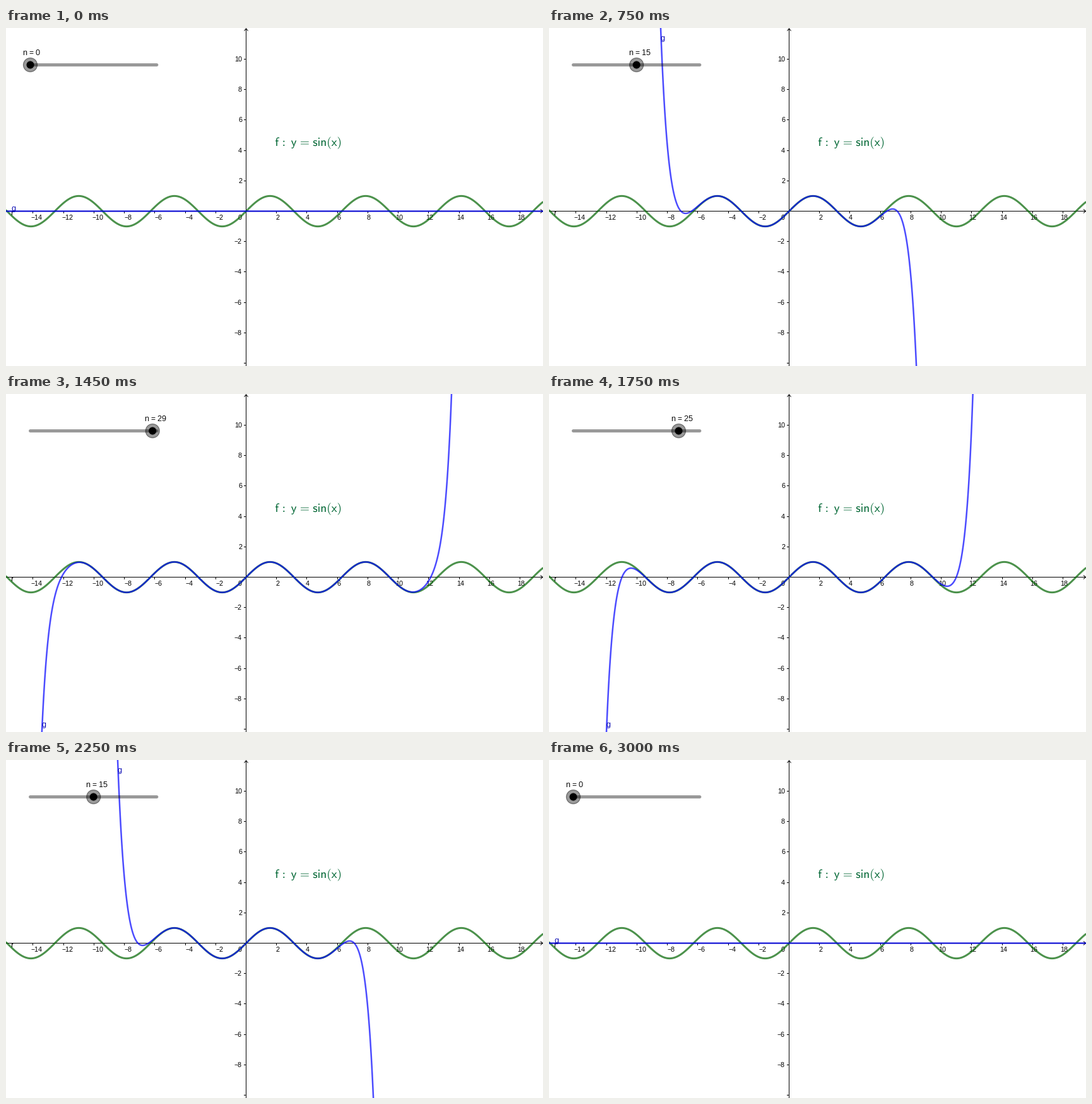
Animation, 851 px wide and 536 px high, one loop 3050 ms. Source, as a matplotlib script:

```python
import math
import numpy as np
import matplotlib as mpl
import matplotlib.pyplot as plt
from matplotlib.animation import FuncAnimation
from matplotlib.patches import Circle, PathPatch
from matplotlib.textpath import TextPath
from matplotlib.transforms import Affine2D

W, H, DPI = 851, 536, 100
OX, OY, UNIT = 380.5, 290.5, 24.12
N_MAX, FRAMES = 30, 61
SLIDER_X, SLIDER_Y, SLIDER_STEP = 38.5, 58.5, 6.68
BLUE, GREEN = (0, 0, 1, 0.7), (0, 100 / 255, 0, 0.7)
FORMULA = (r"$\mathsf{f}\hspace{0.117}:\hspace{0.31}\mathsf{y}"
           r"\hspace{0.117}=\hspace{0.117}\mathsf{sin(x)}$")

mpl.rcParams.update({
    "text.hinting": "native",
    "text.hinting_factor": 1,
    "mathtext.fontset": "cm",
    "path.simplify": False,
    "lines.solid_capstyle": "butt",
})


def px(size):
    """Convert pixels to points."""
    return size * 72 / DPI


fig = plt.figure(figsize=(W / DPI, H / DPI), dpi=DPI, facecolor="white")
ax = fig.add_axes([0, 0, 1, 1])
ax.set(xlim=(0, W), ylim=(H, 0))
ax.axis("off")


def line(xs, ys, width=1, color="black", z=1, **kw):
    return ax.plot(xs, ys, lw=px(width), color=color, zorder=z,
                   snap=False, **kw)[0]


def label(x, y, text, size=12, color="black", ha="left", z=2):
    return ax.text(x, y, text, fontsize=px(size), color=color, ha=ha,
                   va="baseline", family="Liberation Sans", zorder=z)


def number(value):
    return str(value).replace("-", "\u2212")


def draw_axes():
    line([0, W], [OY, OY])
    line([OX, OX], [0.5, H])
    line([OX - 3, OX, OX + 3], [4.5, 1, 4.5])
    line([W - 4, W - 0.5, W - 4], [OY - 3, OY, OY + 3])
    line([9.5, 9.5], [OY, OY + 6.5])
    line([9.5, 11.5], [OY + 2, OY])
    for v in range(-14, 20, 2):
        x = math.floor(OX + v * UNIT) + 0.5
        if v:
            line([x, x], [OY, OY + 3.5])
            label(x + (6 if v < 0 else 1.5), 304, number(v), 11, ha="center")
    for v in range(-10, 12, 2):
        y = math.floor(OY - v * UNIT) + 0.5
        if v:
            line([OX - 3.5, OX], [y, y])
        if v and v > -10:
            label(374, y + 3.5, number(v), 11, ha="right")
    label(374, 304, "0", 11, ha="right")


def draw_formula(x, y, size):
    path = TextPath((0, 0), FORMULA, size=size)
    place = Affine2D().scale(1, -1).translate(x, y)
    ax.add_patch(PathPatch(place.transform_path(path), fc="#006633",
                           ec="none", zorder=5))


def taylor(x, n):
    """Taylor polynomial of sin around 0, up to degree n."""
    total = np.zeros_like(x)
    for k in range(1, n + 1, 2):
        total += (-1) ** (k // 2) * x ** k / math.factorial(k)
    return total


draw_axes()
draw_formula(426.4, 187, 19.3)
xs = np.linspace(-2, W + 2, 3421)
units = (xs - OX) / UNIT
line(xs, OY - UNIT * np.sin(units), 3, GREEN, 3)
curve = line([], [], 2.5, BLUE, 4)
curve_name = label(0, 0, "g", color="#0000b0", z=5)

line([SLIDER_X, SLIDER_X + N_MAX * SLIDER_STEP], [SLIDER_Y] * 2, 5,
     (0, 0, 0, 0.4), 6, solid_capstyle="round")
knob = [
    Circle((0, 0), 11, fc=(0, 0, 0, 0.4), ec="none", zorder=7),
    Circle((0, 0), 11, fc="none", ec=(0, 0, 0, 0.45), lw=px(1.2), zorder=8),
    Circle((0, 0), 6, fc="black", ec="none", zorder=9),
]
for part in knob:
    ax.add_patch(part)
n_text = label(0, 43, "", z=9)


def update(i):
    n = N_MAX - abs(N_MAX - i)
    ys = OY - UNIT * taylor(units, n)
    curve.set_data(xs, np.clip(ys, -3000, 3000))

    first = np.argmax((ys >= 0) & (ys <= H) & (xs >= 0))
    if n == 0:
        curve_name.set_position((8, 290))
    else:
        on_top = ys[first] < H / 2
        curve_name.set_position((math.floor(xs[first]) - 0.4,
                                 20 if on_top else 528))

    x = SLIDER_X + n * SLIDER_STEP
    for part in knob:
        part.center = (x, SLIDER_Y)
    n_text.set_text(f"n = {n}")
    n_text.set_x(math.floor(x - 11.5))
    return [curve, curve_name, n_text, *knob]


anim = FuncAnimation(fig, update, frames=FRAMES, interval=50,
                     repeat=True, repeat_delay=0, blit=False)
plt.show()
```
